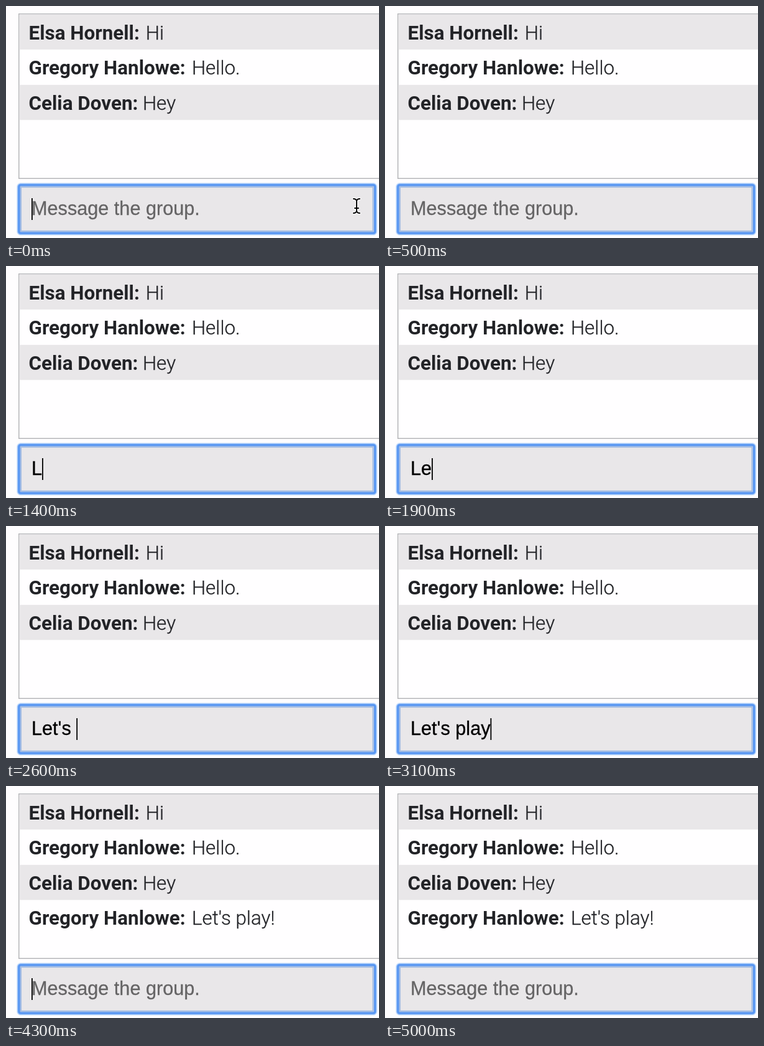
Recreate the animation shown at these times as an HTML page. Size 600x373 px, loop 5100 ms.

```html
<!DOCTYPE html>
<html lang="en">
<head>
<meta charset="utf-8">
<title>Group chat</title>
<style>
  html, body { margin: 0; width: 100%; height: 100%; overflow: hidden; background: #fefdfe; }
  svg { display: block; width: 600px; height: 373px; }
  text { white-space: pre; }
  .chat { font: 300 31.4px Roboto, sans-serif; fill: #222327; stroke: #222327; stroke-width: .3; }
  .name { font-weight: 700; stroke: none; }
  .field { font: 30.65px "Liberation Sans", Arial, sans-serif; stroke-width: .3; }
  .hint { fill: #656465; stroke: #656465; }
  .typed { fill: #000; stroke: #000; }
  .band { fill: #e9e7e9; }
  .ring { fill: none; }
  .beam { fill: none; stroke-linecap: round; }
</style>
</head>
<body>
<svg viewBox="0 0 600 373">
  <defs>
    <rect id="frame" x="21" y="288" width="572.5" height="77" rx="2.5"/>
    <path id="beam" d="M559 310q4 0 5 3V330q-1 3-5 3M569 310q-4 0-5 3M564 330q1 3 5 3M561 325h6"/>
  </defs>

  <rect x="20.75" y="12.75" width="600" height="264.5" fill="#fffeff" stroke="#b4b5b8" stroke-width="1.5"/>
  <rect class="band" x="21.5" y="13.5" width="579" height="56.5"/>
  <rect class="band" x="21.5" y="126.8" width="579" height="56.5"/>
  <g class="chat">
    <text class="name" x="36.5" y="53.5">Elsa Hornell:</text><text x="224.8" y="53.5">Hi</text>
    <text class="name" x="36.5" y="110">Gregory Hanlowe:</text><text x="298.9" y="110">Hello.</text>
    <text class="name" x="36.5" y="166.6">Celia Doven:</text><text x="219.9" y="166.6">Hey</text>
    <g id="reply">
      <text class="name" x="36.5" y="223.2">Gregory Hanlowe:</text><text x="298.9" y="223.2">Let's play!</text>
    </g>
  </g>

  <g class="ring">
    <use href="#frame" stroke="#d9e8fc" stroke-width="8"/>
    <use href="#frame" stroke="#9cc4f9" stroke-width="5.6"/>
    <use href="#frame" class="band" stroke="#5896f2" stroke-width="3.6"/>
    <rect x="24" y="291" width="566.5" height="71" stroke="#a5bde2" stroke-width="2.2"/>
  </g>
  <g class="field">
    <text id="hint" class="hint" x="41" y="336">Message the group.</text>
    <text id="typed" class="typed" x="41" y="336" xml:space="preserve"></text>
  </g>
  <rect id="caret" x="41" y="309" width="1.8" height="35"/>
  <g id="pointer" class="beam">
    <use href="#beam" stroke="#fff" stroke-opacity=".75" stroke-width="4.5"/>
    <use href="#beam" stroke="#000" stroke-width="1.9"/>
  </g>
</svg>
<script>
  const LOOP = 5100, BLINK = 500, SENT = 4200, POINTER_GONE = 400;
  const MESSAGE = "Let's play!";
  const KEYS = [1200, 1500, 2000, 2200, 2400, 2500, 2700, 2800, 3000, 3100, 3500];
  const [reply, hint, typed, caret, pointer] =
    ["reply", "hint", "typed", "caret", "pointer"].map(id => document.getElementById(id));
  const show = (el, on) => el.setAttribute("visibility", on ? "visible" : "hidden");

  function draw(t) {
    const sent = t >= SENT;
    const count = sent ? 0 : KEYS.filter(k => k <= t).length;
    const lastEdit = sent ? SENT : count ? KEYS[count - 1] : 0;

    typed.textContent = MESSAGE.slice(0, count);
    caret.setAttribute("x", 41 + (count ? typed.getComputedTextLength() : 0));
    show(caret, Math.floor((t - lastEdit) / BLINK) % 2 === 0);
    show(hint, !count);
    show(reply, sent);
    show(pointer, t < POINTER_GONE);
  }

  const start = performance.now();
  function tick() {
    draw((performance.now() - start) % LOOP);
    requestAnimationFrame(tick);
  }
  tick();
</script>
</body>
</html>
```
